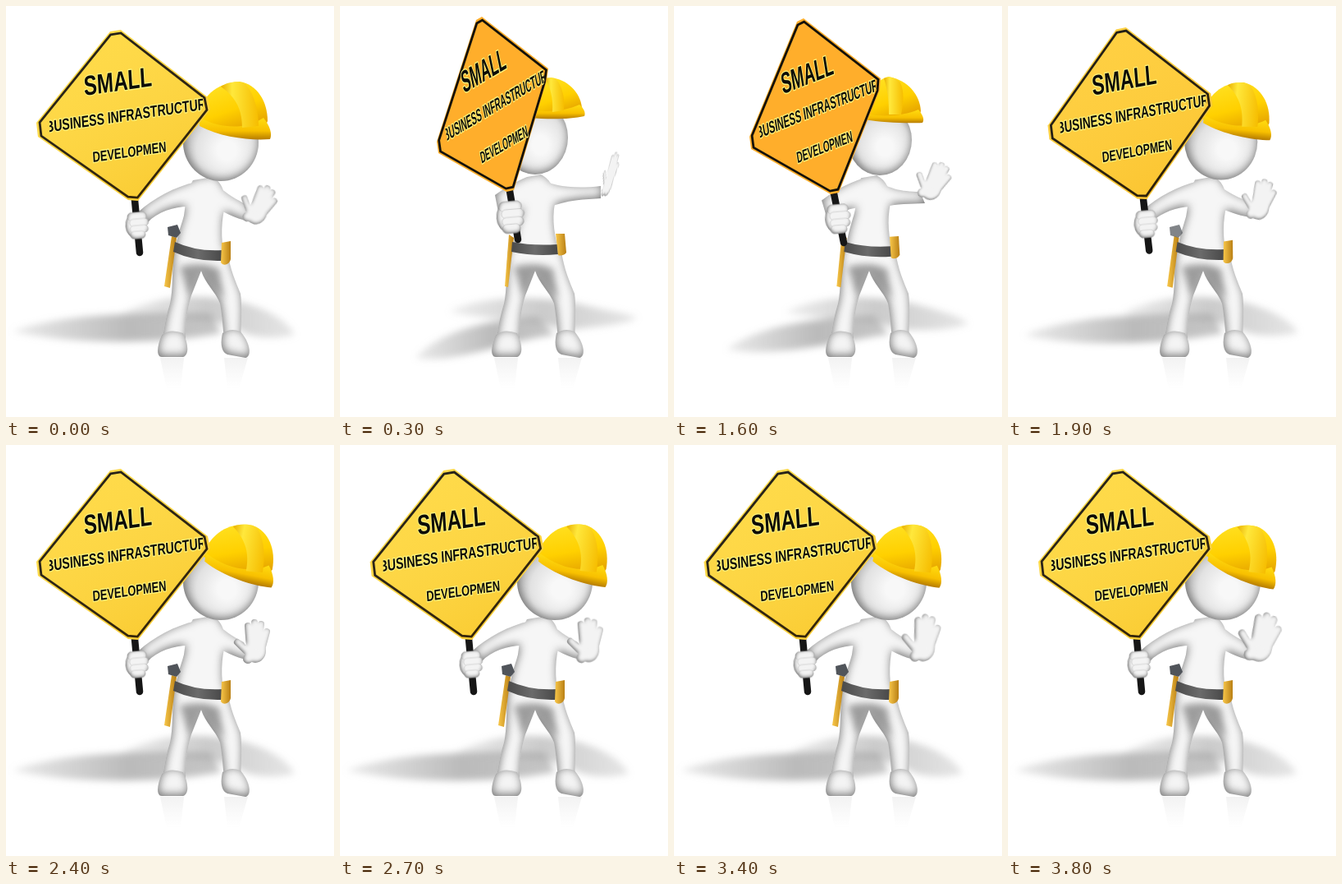
An HTML page for the animation above (4 s loop, 400 by 500 pixels).

```html
<!DOCTYPE html>
<html lang="en">
<head>
<meta charset="utf-8">
<title>Builder with a sign</title>
<style>
html, body { margin: 0; width: 100%; height: 100%; overflow: hidden; background: #fff; }
svg { display: block; width: 400px; height: 500px; }
text { font-family: "Liberation Sans", Arial, sans-serif; font-weight: bold; fill: #0c0c08; stroke: #fff27a; stroke-width: 2.8; stroke-linejoin: round; paint-order: stroke; }
</style>
</head>
<body>
<svg viewBox="0 0 400 500">
  <defs>
    <filter id="round" x="-20%" y="-20%" width="140%" height="140%" color-interpolation-filters="sRGB">
      <feGaussianBlur in="SourceAlpha" stdDeviation="5.5"/>
      <feOffset dx="1" dy="-2" result="b"/>
      <feFlood flood-color="#646464" flood-opacity=".9"/>
      <feComposite in2="b" operator="out"/>
      <feComposite in2="SourceAlpha" operator="in" result="s"/>
      <feMerge><feMergeNode in="SourceGraphic"/><feMergeNode in="s"/></feMerge>
    </filter>
    <filter id="small" x="-30%" y="-30%" width="160%" height="160%" color-interpolation-filters="sRGB">
      <feGaussianBlur in="SourceAlpha" stdDeviation="2"/>
      <feOffset dx=".5" dy="-1" result="b"/>
      <feFlood flood-color="#606060" flood-opacity=".95"/>
      <feComposite in2="b" operator="out"/>
      <feComposite in2="SourceAlpha" operator="in" result="s"/>
      <feMerge><feMergeNode in="SourceGraphic"/><feMergeNode in="s"/></feMerge>
    </filter>
    <filter id="blur" x="-20%" y="-50%" width="140%" height="200%"><feGaussianBlur stdDeviation="4"/></filter>
    <radialGradient id="skin" cx=".58" cy=".6" r=".62">
      <stop offset=".2" stop-color="#f8f8f8"/><stop offset=".65" stop-color="#e2e2e2"/><stop offset="1" stop-color="#adadad"/>
    </radialGradient>
    <linearGradient id="castL">
      <stop offset="0" stop-color="#aaa" stop-opacity=".25"/><stop offset=".55" stop-color="#a4a4a4" stop-opacity=".75"/><stop offset="1" stop-color="#a0a0a0" stop-opacity=".6"/>
    </linearGradient>
    <linearGradient id="castR">
      <stop offset="0" stop-color="#aaa" stop-opacity=".2"/><stop offset=".5" stop-color="#a8a8a8" stop-opacity=".6"/><stop offset="1" stop-color="#aaa" stop-opacity=".3"/>
    </linearGradient>
    <linearGradient id="hat" x1=".2" y1="0" x2=".7" y2="1">
      <stop offset="0" stop-color="#ffe326"/><stop offset=".55" stop-color="#ffd000"/><stop offset="1" stop-color="#e09a00"/>
    </linearGradient>
    <linearGradient id="ridge" x1="0" x2="1">
      <stop offset="0" stop-color="#e9b000"/><stop offset=".3" stop-color="#ffe83c"/><stop offset="1" stop-color="#f6bd00"/>
    </linearGradient>
    <linearGradient id="brim" x1="0" y1="0" x2="0" y2="1">
      <stop offset="0" stop-color="#ffdc10"/><stop offset=".6" stop-color="#f8c000"/><stop offset="1" stop-color="#b67c00"/>
    </linearGradient>
    <linearGradient id="gold" x1="0" x2="1">
      <stop offset="0" stop-color="#f8c74a"/><stop offset="1" stop-color="#b97f14"/>
    </linearGradient>
    <linearGradient id="sheen" x1="0" y1="0" x2=".6" y2="1">
      <stop offset="0" stop-color="#fff" stop-opacity=".06"/><stop offset="1" stop-color="#e08a00" stop-opacity=".16"/>
    </linearGradient>
    <linearGradient id="leather" x1="0" x2="1">
      <stop offset="0" stop-color="#4a4a4a"/><stop offset=".5" stop-color="#6b6b6b"/><stop offset="1" stop-color="#484848"/>
    </linearGradient>
    <linearGradient id="fade" x1="0" y1="0" x2="0" y2="1">
      <stop offset="0" stop-color="#ccc" stop-opacity=".25"/><stop offset="1" stop-color="#ddd" stop-opacity="0"/>
    </linearGradient>
    <clipPath id="crop"><rect x="53" y="60" width="187" height="150"/></clipPath>
    <path id="legs" d="M205 296C202 325 204 345 200 362C193 385 193 395 190 408L219 408C218 390 221 368 226 352L238 322C243 338 256 348 261 362C264 380 265 395 266 408L286 408C287 385 288 365 286 350C280 335 273 320 270 298Z"/>
    <clipPath id="inLegs"><use href="#legs"/></clipPath>
  </defs>

  <g filter="url(#blur)"><path id="shadeL" fill="url(#castL)"/><path id="shadeR" fill="url(#castR)"/></g>
  <path fill="url(#fade)" d="M188 428H217L213 466H196ZM266 428H295L284 466H270Z"/>

  <g filter="url(#round)" fill="#f6f6f6">
    <path id="armL"/><path id="armR"/><path id="torso"/>
    <use href="#legs"/>
  </g>
  <g clip-path="url(#inLegs)">
    <path filter="url(#blur)" fill="#6e6e6e" opacity=".65" d="M212 317Q240 311 260 320L266 356Q246 340 238 322Q230 342 223 354Z"/>
  </g>
  <g filter="url(#round)" fill="#f4f4f4">
    <path d="M190 400C184 414 183 427 190 427L216 427C224 424 222 410 216 398Q200 392 190 400Z"/>
    <path d="M264 398C261 412 263 421 270 424L292 428C300 426 298 410 286 396Q274 391 264 398Z"/>
  </g>
  <path id="tool" fill="url(#gold)"/>
  <path id="belt" fill="url(#leather)"/>
  <path id="pouch" fill="url(#gold)"/>
  <path id="hammer" fill="#50545a" d="M197 269L209 266L213 276L208 282L198 279Z"/>

  <g id="hand" filter="url(#small)" fill="#f3f3f3" stroke="#f3f3f3" stroke-linecap="round">
    <ellipse cy="3" rx="13" ry="15" stroke="none"/>
    <path stroke-width="12" d="M0 6L-9 13"/>
    <path stroke-width="8" fill="none" d="M-7 0L-9 -27M-2 -2L-1 -31M4 -2L7 -29M8 2L14 -20M-5 10L-22 -7"/>
  </g>

  <ellipse id="head" fill="url(#skin)" filter="url(#round)"/>
  <g id="helmet">
    <path id="dome" fill="url(#hat)"/>
    <path id="rim" fill="url(#brim)"/>
    <path id="band" fill="url(#ridge)"/>
  </g>

  <path id="pole" stroke="#161616" stroke-width="8.5" stroke-linecap="round"/>
  <g id="sign">
    <path id="edge"/>
    <path id="face" stroke="#14110a" stroke-width="2.8"/>
    <path id="gloss" fill="url(#sheen)"/>
    <g id="words" clip-path="url(#crop)">
      <text transform="matrix(.72 -.102 .06 1 95.5 109)" font-size="33.5">SMALL</text>
      <text transform="matrix(.72 -.105 .06 1 48.5 154)" font-size="19.5">BUSINESS INFRASTRUCTUR</text>
      <text transform="matrix(.72 -.102 .06 1 106 190)" font-size="17.8">DEVELOPMEN</text>
    </g>
  </g>
  <g id="fist" filter="url(#small)" fill="#f3f3f3" stroke="#c2c2c2" stroke-width=".6">
    <ellipse cx="-3" rx="11" ry="15"/>
    <rect x="-11" y="-16" width="23" height="10" rx="5"/>
    <rect x="-9" y="-8" width="23" height="9" rx="4.5"/>
    <rect x="-9" y="0" width="22" height="9" rx="4.5"/>
    <rect x="-9" y="7" width="18" height="9" rx="4.5"/>
  </g>
</svg>
<script>
const $ = id => document.getElementById(id);
const mix = (a, b, k) => a + (b - a) * k;

// Blend two path strings that share one structure.
function blend(a, b, k) {
  const to = b.match(/-?[\d.]+/g);
  let i = 0;
  return a.replace(/-?[\d.]+/g, n => mix(+n, +to[i++], k).toFixed(2));
}

// Paths facing front, (part-turned,) and fully turned.
const MID = .67;
const shapes = {
  shadeL: ["M8 396C60 377 140 372 250 374L262 398C200 410 90 414 8 396Z",
           "M92 428C120 400 160 384 240 378L262 400C200 408 140 436 92 428Z"],
  shadeR: ["M140 374C190 350 240 350 285 360C320 368 345 385 352 400C330 406 290 404 280 390C240 378 190 382 140 374Z",
           "M133 372C170 352 240 352 290 362C320 370 355 374 362 380C340 390 300 390 275 395C250 382 190 384 133 372Z"],
  tool: ["M202 280L208 282L200 343L193 341Z", "M206 278L212 282L205 342L201 341Z"],
  armL: ["M232 214C205 220 180 234 162 250L172 264C185 250 205 244 222 244Z",
         "M228 208C214 214 200 222 189 230L194 256C206 254 215 248 226 246Z"],
  armR: ["M252 214C268 227 275 232 290 240L302 262C285 262 270 252 255 246Z",
         "M250 214C262 221 275 226 300 226L306 240C290 241 270 240 255 245Z",
         "M245 210C258 219 285 223 318 219L318 234C300 235 275 236 255 245Z"],
  torso: ["M228 212C220 225 219 240 217 255C213 270 208 280 206 300L266 306C262 280 262 262 268 240C266 222 262 214 252 208Z",
          "M228 208C224 225 225 250 218 262C214 275 212 285 211 300L268 304C262 280 258 262 262 240C262 222 258 212 245 205Z"],
  belt: ["M206 287Q232 299 264 297L263 310Q230 311 204 299Z",
         "M210 287Q235 292 265 290L266 302Q238 305 209 299Z"],
  pouch: ["M263 288L274 286L274 308C272 316 264 316 262 312Z",
          "M263 277L274 277L276 300C273 304 268 304 266 303Z"],
  dome: ["M232 140C238 110 255 94 285 92C306 95 319 116 319 140L312 156C285 156 255 150 232 140Z",
         "M230 134C236 105 248 88 262 86C285 90 300 108 301 128L296 140C275 143 250 140 230 134Z",
         "M230 132C235 105 245 90 257 87C277 89 293 105 295 123L291 134C270 136 250 138 230 132Z"],
  band: ["M262 98C270 92 285 90 292 95C304 108 308 130 308 146L288 148C288 128 282 112 262 98Z",
         "M256 88C263 85 272 88 276 93C281 104 280 118 277 132L262 132C262 114 260 100 256 88Z",
         "M250 88C256 86 262 88 266 92C273 104 274 115 273 127L259 129C260 112 257 100 250 88Z"],
  rim: ["M236 136C260 148 290 152 314 136C322 146 325 156 322 162C300 164 262 160 236 146Z",
        "M232 130C250 136 280 134 298 126C303 132 306 138 303 142C285 143 255 142 232 138Z",
        "M230 126C250 130 275 128 292 120C297 124 300 130 298 134C280 138 255 138 230 136Z"],
  pole: ["M157 236L163 300", "M195 228L207 288", "M207 225L217 284"],
  edge: ["M127 31L140 29L246 111L249 126L161 237L149 236L39 159L37 142Z",
         "M150 19L158 15L252 88L251 102L201 227L191 229L94 174L92 159Z",
         "M166 17L173 13L254 76L252 91L212 224L203 226L120 179L118 165Z"]
};

function turned(keys, p) {
  if (keys.length < 3) return blend(keys[0], keys[1], p);
  return p < MID ? blend(keys[0], keys[1], p / MID) : blend(keys[1], keys[2], (p - MID) / (1 - MID));
}

// Shrink a polygon towards its middle.
function inset(d, k) {
  const n = d.match(/-?[\d.]+/g).map(Number);
  const mid = o => n.reduce((s, v, i) => i % 2 === o ? s + v : s, 0) / (n.length / 2);
  const c = [mid(0), mid(1)];
  let i = 0;
  return d.replace(/-?[\d.]+/g, v => mix(c[i++ % 2], +v, k).toFixed(2));
}

// Tracks: [step, value, ...], linear between keys.
function at(track, t) {
  let i = 0;
  while (i < track.length - 2 && track[i + 1][0] <= t) i++;
  const [a, b] = [track[i], track[i + 1]];
  const k = Math.min(1, (t - a[0]) / (b[0] - a[0]));
  return a.slice(1).map((v, j) => mix(v, b[j + 1], k));
}

const turn = [[0, 0], [1, .22], [2, .74], [3, 1], [4, 1.06], [6, 1.08], [9, 1.09], [12, 1.06], [13, 1.01],
  [14, .93], [15, .82], [16, .67], [17, .5], [18, .32], [19, .14], [20, .05], [21, .01], [22, 0], [38, 0]];
const tilt = [[0, 0], [16, 0], [20, 7], [24, 11], [31, 10], [38, 13]];
const lean = [[0, 0], [24, 0], [31, -.5], [38, 0]];
// x, y, angle, width, height
const wave = [[0, 307, 249, 25, .95, .95], [1, 310, 244, 23, .9, .95], [2, 322, 225, 18, .55, 1],
  [3, 328, 213, 15, .35, 1.05], [9, 321, 214, 17, .35, 1.05], [12, 320, 216, 18, .5, 1.02],
  [16, 315, 220, 25, .92, .92], [19, 307, 243, 13, .92, .95], [24, 304, 247, 0, 1, 1],
  [31, 302, 244, -2, 1, 1.05], [38, 308, 243, 14, 1.15, 1.15]];
// Centre and radii of the head; place and size of the fist, by turn.
const skull = [[0, 262, 166, 46, 47], [MID, 251, 163, 39, 43], [1, 238, 160, 40, 45]];
const grip = [[0, 160, 267, 1], [MID, 200, 259, 1.1], [1, 208, 257, 1.2]];

function draw(t) {
  const [p] = at(turn, t);
  for (const id in shapes) $(id).setAttribute("d", turned(shapes[id], p));

  const outline = $("edge").getAttribute("d");
  const board = inset(outline, .962);
  const warm = Math.min(1, p / .6);
  const paint = `rgb(255,${mix(217, 174, warm) | 0},${mix(62, 43, warm) | 0})`;
  $("edge").setAttribute("fill", paint);
  $("face").setAttribute("fill", paint);
  $("face").setAttribute("d", board);
  $("gloss").setAttribute("d", outline);
  $("gloss").setAttribute("opacity", 1 - warm);
  $("words").setAttribute("transform",
    `translate(${97 + 55 * p} ${109 - 3 * p}) matrix(${1 - .337 * p} ${-.2225 * p} ${.181 * p} ${1 + .084 * p} 0 0) translate(-97 -109)`);
  $("sign").setAttribute("transform", `rotate(${at(lean, t)[0]} 156 237)`);

  const [cx, cy, rx, ry] = at(skull, p);
  Object.entries({ cx, cy, rx, ry }).forEach(([k, v]) => $("head").setAttribute(k, v));
  const [a] = at(tilt, t);
  $("helmet").setAttribute("transform", `translate(${a * .17} 0) rotate(${a} ${cx} ${cy})`);

  const [x, y, r, w, h] = at(wave, t);
  $("hand").setAttribute("transform", `translate(${x} ${y}) rotate(${r}) scale(${w} ${h})`);
  const [fx, fy, fs] = at(grip, p);
  $("fist").setAttribute("transform", `translate(${fx} ${fy}) rotate(-5) scale(${fs})`);
  $("hammer").setAttribute("opacity", Math.max(0, 1 - 2 * p));
}

// The picture changes every 100 ms; the last one stays for 200 ms.
function tick(now) {
  draw(Math.min(38, Math.floor(now % 4000 / 100)));
  requestAnimationFrame(tick);
}
draw(0);
requestAnimationFrame(tick);
</script>
</body>
</html>
```
